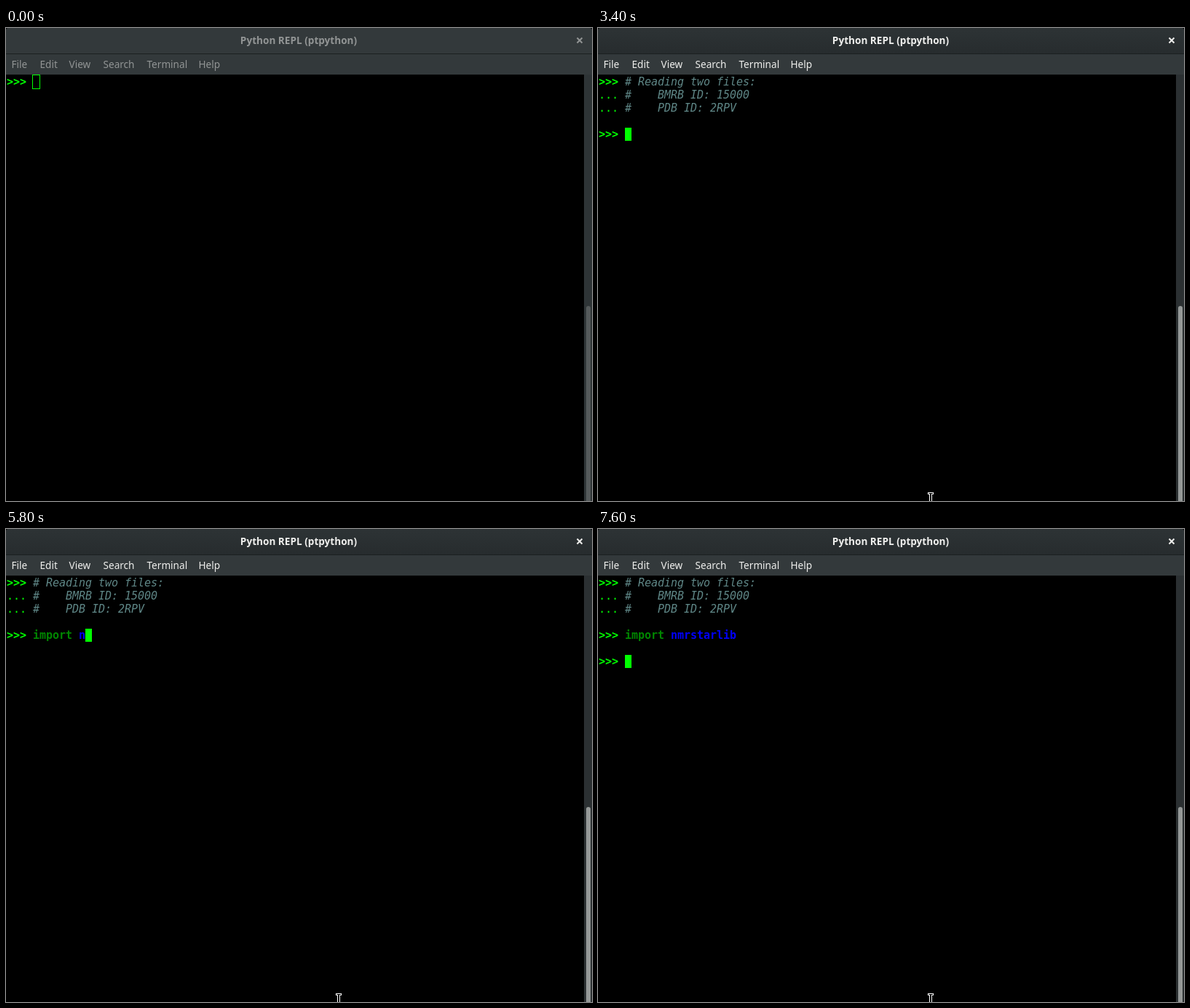
Animation of 805x650 px, one loop 8 s. Source, as an HTML page with a canvas:

```html
<!DOCTYPE html>
<html>
<head>
<meta charset="utf-8">
<title>Python REPL</title>
<style>
  html, body { margin: 0; width: 805px; height: 650px; overflow: hidden; background: #000; }
  canvas { display: block; }
</style>
</head>
<body>
<canvas id="stage" width="805" height="650"></canvas>
<script>
const ctx = document.getElementById('stage').getContext('2d');
const LOOP = 8000, CELL = 9, LINE = 18, LEFT = 1, TOP = 65;
const GREEN = '#00ff00';
const COMMENTS = ['# Reading two files:', '#    BMRB ID: 15000', '#    PDB ID: 2RPV'];
const KEYWORDS = ['import', 'ImportError', 'ImportWarning'];
const MODULES = ['nmrstarlib'];

// [start ms, row of the prompt, typed input, cursor lit, completions]
const STEPS = [
  [0, 0, '', true],
  [1100, 0, '', false],
  [1800, 0, '', true],
  [2100, 2, COMMENTS[2], true],
  [2700, 3, '', true],
  [3200, 3, '', false],
  [3400, 4, '', true],
  [4000, 4, '', false],
  [4400, 4, 'i', true],
  [4500, 4, 'im', true],
  [4600, 4, 'im', true, KEYWORDS],
  [4800, 4, 'impo', true, KEYWORDS],
  [5000, 4, 'import', true, KEYWORDS],
  [5100, 4, 'import ', true],
  [5600, 4, 'import ', false],
  [5800, 4, 'import n', true],
  [5900, 4, 'import nm', true],
  [6000, 4, 'import nm', true, MODULES],
  [6100, 4, 'import nmr', true],
  [6200, 4, 'import nmrs', true],
  [6300, 4, 'import nmrst', true],
  [6400, 4, 'import nmrst', true, MODULES],
  [6500, 4, 'import nmrsta', true],
  [6600, 4, 'import nmrstar', true],
  [6700, 4, 'import nmrstar', true, MODULES],
  [6800, 4, 'import nmrstarl', true],
  [6900, 4, 'import nmrstarli', true],
  [7000, 4, 'import nmrstarlib', true],
  [7500, 4, 'import nmrstarlib', false],
  [7600, 6, '', true]
];

function rect(x, y, w, h, color) {
  ctx.fillStyle = color;
  ctx.fillRect(x, y, w, h);
}

// Terminal text sits on a fixed character grid
function print(col, row, text, color, style = '') {
  ctx.font = `${style} 15px "DejaVu Sans Mono", monospace`;
  ctx.textAlign = 'left';
  ctx.fillStyle = color;
  [...text].forEach((ch, i) =>
    ctx.fillText(ch, LEFT + (col + i) * CELL, TOP + row * LINE + 14));
}

function label(text, x, y, color, style = '') {
  ctx.font = `${style} 13.6px "Noto Sans", sans-serif`;
  ctx.fillStyle = color;
  ctx.fillText(text, x, y);
}

function drawWindow(focused) {
  const ink = focused ? '#eeeeec' : '#919494';
  rect(0, 0, 805, 650, '#000');

  ctx.beginPath();
  ctx.roundRect(0, 0, 805, 35, [3, 3, 0, 0]);
  const bar = ctx.createLinearGradient(0, 0, 0, 35);
  bar.addColorStop(0, focused ? '#2d3335' : '#33393b');
  bar.addColorStop(1, focused ? '#272c2e' : '#33393b');
  ctx.fillStyle = bar;
  ctx.fill();
  rect(0, 35, 805, 1, '#1b1f20');
  rect(0, 36, 805, 28, '#33393b');

  ctx.textAlign = 'center';
  label('Python REPL (ptpython)', 402, 22, ink, 'bold');
  ctx.textAlign = 'left';
  [['File', 8], ['Edit', 47], ['View', 87], ['Search', 134], ['Terminal', 194], ['Help', 265]]
    .forEach(([text, x]) => label(text, x - 0.5, 55, ink));

  ctx.strokeStyle = ink;
  ctx.lineWidth = 2;
  ctx.beginPath();
  ctx.moveTo(784.5, 13.5); ctx.lineTo(791.5, 20.5);
  ctx.moveTo(791.5, 13.5); ctx.lineTo(784.5, 20.5);
  ctx.stroke();

  rect(794, 64, 11, 586, focused ? '#2b3032' : '#2e3436');
  ctx.beginPath();
  ctx.roundRect(797, 382, 6, 280, 3);
  ctx.fillStyle = focused ? '#959998' : '#555a5b';
  ctx.fill();
}

function drawInput(row, text) {
  const [keyword, module] = text.split(' ');
  if (module === undefined) return print(4, row, text, GREEN);
  print(4, row, keyword, '#008700', 'bold');
  print(11, row, module, '#0000ff', 'bold');
}

function drawMenu(col, row, items) {
  const width = Math.max(...items.map(item => item.length)) + 2;
  rect(LEFT + col * CELL, TOP + row * LINE, width * CELL, items.length * LINE, '#bcbcbc');
  items.forEach((item, i) => print(col + 1, row + i, item, '#2e3436'));
}

function drawPointer() {
  rect(453, 638, 8, 3, '#fff');
  rect(455, 640, 4, 10, '#fff');
  rect(454, 639, 6, 1, '#000');
  rect(456, 639, 2, 11, '#000');
}

function draw(t) {
  const [, row, input, lit, items] = STEPS.findLast(step => t >= step[0]);
  const focused = t >= 500;
  drawWindow(focused);

  for (const r of [0, 4, 6]) if (r <= row) print(0, r, '>>>', GREEN, 'bold');
  if (row >= 2) {
    COMMENTS.forEach((text, r) => {
      if (r) print(0, r, '...', GREEN);
      print(4, r, text, '#5f8787', 'italic');
    });
  }
  if (row === 3) print(0, 3, '...', GREEN);
  if (row === 6) drawInput(4, 'import nmrstarlib');
  if (row === 4) drawInput(4, input);

  const col = 4 + input.length, x = LEFT + col * CELL, y = TOP + row * LINE;
  if (!focused) {
    ctx.strokeStyle = GREEN;
    ctx.lineWidth = 1;
    ctx.strokeRect(x - 0.5, y - 0.5, 10, 19);
  } else if (lit) {
    rect(x, y, CELL, LINE, GREEN);
  }
  if (items) drawMenu(col, row + 1, items);
  if (t >= 1200) drawPointer();
}

const start = performance.now();
function tick() {
  draw((performance.now() - start) % LOOP);
  requestAnimationFrame(tick);
}
tick();
</script>
</body>
</html>
```
